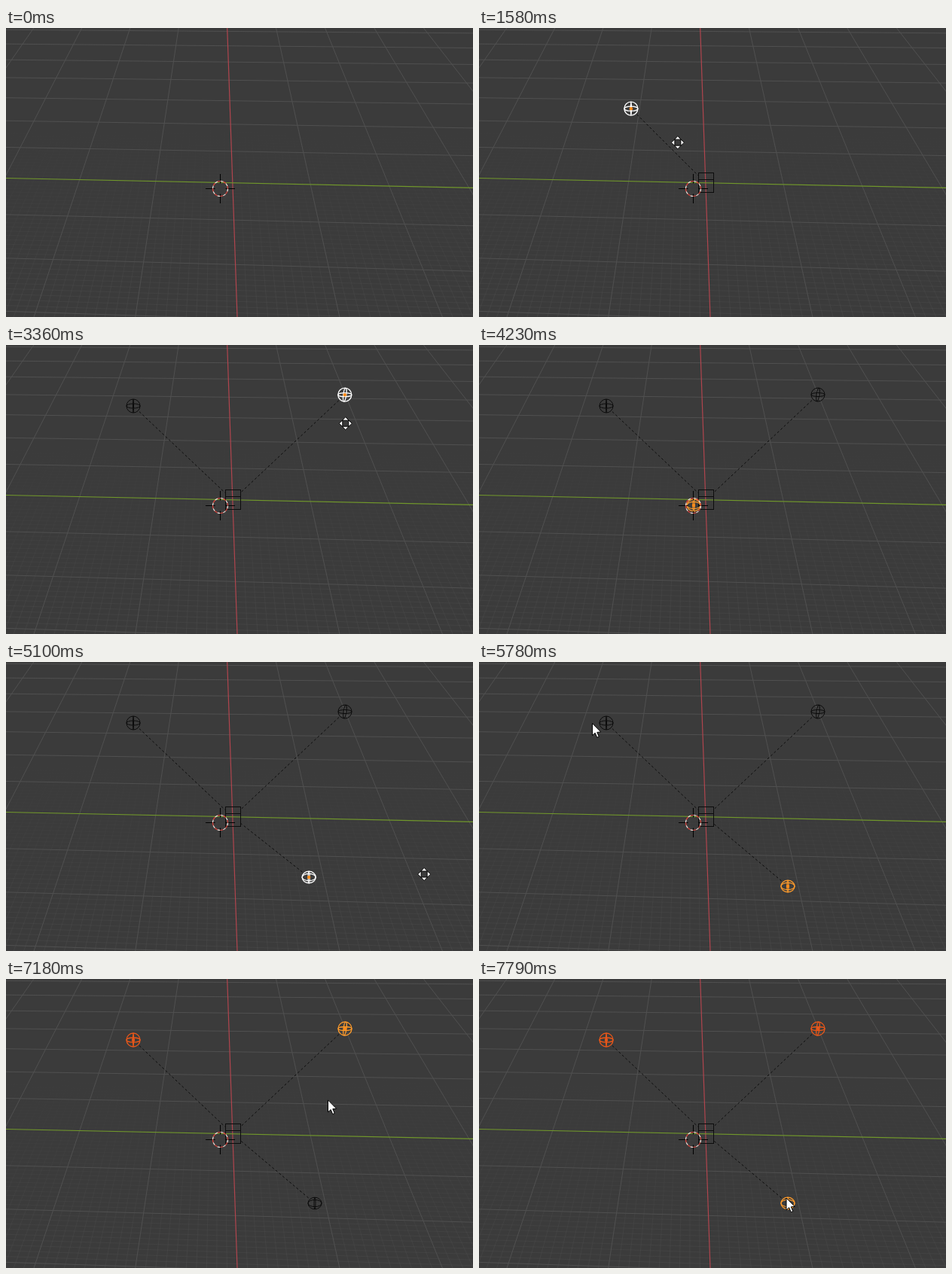
Animation, 620 px wide and 384 px high, one loop 8 s. Source, as an HTML page with a canvas:

```html
<!DOCTYPE html>
<html lang="en">
<head>
<meta charset="utf-8">
<title>Placing three lights</title>
<style>
  html, body { margin: 0; width: 100%; height: 100%; overflow: hidden; background: #3b3b3b; }
  canvas { position: absolute; left: 0; top: 0; width: 620px; height: 384px; }
</style>
</head>
<body>
<canvas id="floor" width="620" height="384"></canvas>
<canvas id="scene" width="620" height="384"></canvas>
<script>
const W = 620, H = 384, LOOP = 8000, STEP = 78;
const BLACK = '#0c0c0c', WHITE = '#ffffff', ACTIVE = '#fb9a2c', PICKED = '#e8571a';
const ORIGIN = [301, 206], PIVOT = [285, 213];

const floor = document.getElementById('floor').getContext('2d');
const ctx = document.getElementById('scene').getContext('2d');

function line(c, x1, y1, x2, y2, color, width = 1) {
  c.strokeStyle = color;
  c.lineWidth = width;
  c.beginPath();
  c.moveTo(x1, y1);
  c.lineTo(x2, y2);
  c.stroke();
}

// Perspective floor: k counts cells towards the viewer, j counts cells to the right.
function rowLine(k, color, width) {
  const d = 1 - 0.0823 * k;
  line(floor, 0, -340 + 539.5 / d, W, -350 + 562.4 / d, color, width);
}
function columnLine(j, color, width) {
  line(floor, 293.7 + 64.7 * j + 0.12 * j * j, 0, 307 + 135.6 * j + 0.3 * j * j, H, color, width);
}
function drawFloor() {
  floor.fillStyle = '#3b3b3b';
  floor.fillRect(0, 0, W, H);
  const faint = floor.createLinearGradient(0, 130, 0, H);
  faint.addColorStop(0, 'rgba(84,84,84,0)');
  faint.addColorStop(1, 'rgba(84,84,84,.3)');
  for (let i = -30; i <= 34; i++) if (i % 10) rowLine(i / 10, faint);
  for (let i = -50; i <= 50; i++) if (i % 10) columnLine(i / 10, faint);
  for (let k = -7; k <= 3; k++) if (k) rowLine(k, '#505050');
  for (let j = -5; j <= 5; j++) if (j) columnLine(j, '#505050');
  columnLine(0, '#b0454e', 1.2);
  rowLine(0, '#71982b', 1.2);
}

// A curved hand movement that slows down and is sampled once per STEP.
const mid = (a, b) => a.map((v, i) => (v + b[i]) / 2);
const shift = (p, from, to) => p.map((v, i) => v + to[i] - from[i]);
function glide(start, end, from, to, via = mid(from, to), leaves = false) {
  return { start, end, from, to, via, leaves };
}
function along({ start, end, from, to, via }, t) {
  const held = Math.floor((t - start) / STEP + 0.15) * STEP;
  const q = (1 - Math.min(1, Math.max(0, held / (end - start)))) ** 1.56, p = 1 - q;
  return from.map((v, i) => q * q * v + 2 * p * q * via[i] + p * p * to[i]);
}

// ry: outline height, flat: level ring height, slim: upright ring width.
const lights = [
  { born: 850, grab: 1330, settle: 1720, picked: 6090, hand: [347, 258],
    via: [241, 132], home: [169, 81], ry: 9, flat: 3, slim: 0.5, tilt: 0 },
  { born: 2660, grab: 3050, settle: 3366, picked: 6930, hand: [286, 251],
    via: [360, 150], home: [450, 66], ry: 9, flat: 2.5, slim: 2, tilt: 0.14 },
  { born: 4230, grab: 4380, settle: 5318, picked: 7710, hand: [438, 209],
    via: [380, 245], home: [410, 298], ry: 7.8, flat: 4.6, slim: 1, tilt: 0 }
];
const SELECT = lights[0].picked;
lights.forEach((light, i) => {
  const next = lights[i + 1] || { born: SELECT, picked: LOOP };
  light.drop = light.settle + STEP;
  light.rest = next.born;
  light.passed = next.picked;
  light.path = glide(light.grab, light.settle, PIVOT, light.home, light.via);
});

function lightColor({ born, grab, drop, rest, picked, passed }, t) {
  if (t < born) return null;
  if (t >= grab && t < drop) return WHITE;
  if (t < rest) return ACTIVE;
  if (t < picked) return BLACK;
  return t < passed ? ACTIVE : PICKED;
}

const drag = ({ grab, settle, hand, home, via }) =>
  glide(grab, settle, hand, shift(hand, PIVOT, home), shift(hand, PIVOT, via));
const drags = lights.map(drag);
const release = (i, end, to, via, leaves) =>
  glide(lights[i].drop, end, drags[i].to, to, via, leaves);

const atFirst = [169, 83], atSecond = [442, 64], atThird = [408, 291], corner = [570, 347];
const strokes = [
  glide(70, 150, corner, corner, corner, true),
  glide(1020, 1170, [386, 242], [347, 259]),
  drags[0],
  release(0, 2110, [495, 150], undefined, true),
  glide(2660, 2810, [434, 200], [286, 251]),
  drags[1],
  release(1, 3680, [560, 130], undefined, true),
  drags[2],
  release(2, 5940, atFirst, [60, 60]),
  glide(6090, 6860, atFirst, atSecond, [393, 27]),
  glide(6930, 7710, atSecond, atThird)
];

function ring(x, y, rx, ry, tilt = 0) {
  ctx.beginPath();
  ctx.ellipse(x, y, rx, ry, tilt, 0, Math.PI * 2);
  ctx.stroke();
}
function disc(x, y, r, color) {
  ctx.fillStyle = color;
  ctx.beginPath();
  ctx.arc(x, y, r, 0, Math.PI * 2);
  ctx.fill();
}

function drawTether(x, y) {
  const dx = ORIGIN[0] - x, dy = ORIGIN[1] - y, len = Math.hypot(dx, dy);
  if (len < 30) return;
  const at = d => [x + dx * d / len, y + dy * d / len];
  ctx.setLineDash([3, 3]);
  line(ctx, ...at(11), ...at(len - 14), BLACK);
  ctx.setLineDash([]);
}

function drawLight(light, t) {
  const color = lightColor(light, t);
  if (!color) return;
  const [x, y] = along(light.path, t);
  drawTether(x, y);
  ctx.strokeStyle = color;
  ctx.lineWidth = color === BLACK ? 1 : 1.3;
  ring(x, y, 9, light.ry);
  ring(x, y, 9, light.flat);
  ring(x, y, light.slim, light.ry, light.tilt);
  if (color !== BLACK) disc(x, y, 2.2, color === PICKED ? PICKED : '#ff8c1a');
}

function drawBox() {
  ctx.strokeStyle = BLACK;
  ctx.lineWidth = 1;
  ctx.strokeRect(291.5, 192.5, 20, 26);
  line(ctx, 291, 201.5, 311, 201.5, BLACK);
}

function drawPivot() {
  const x = 284.5, y = 213.5, dash = 10 * Math.PI / 8;
  for (const s of [-1, 1]) {
    line(ctx, x + s * 7, y, x + s * 19.5, y, '#000');
    line(ctx, x, y + s * 7, x, y + s * 19.5, '#000');
  }
  ctx.setLineDash([dash, dash]);
  ['#f4e6e2', '#e2443c'].forEach((color, i) => {
    ctx.strokeStyle = color;
    ctx.lineWidth = 1.2;
    ctx.lineDashOffset = i * dash;
    ring(x, y, 10, 10);
  });
  ctx.lineDashOffset = 0;
  ctx.setLineDash([]);
}

function shape(points, x, y) {
  ctx.beginPath();
  for (const [px, py] of points) ctx.lineTo(x + px, y + py);
  ctx.closePath();
  ctx.fillStyle = WHITE;
  ctx.strokeStyle = '#000';
  ctx.lineWidth = 1;
  ctx.fill();
  ctx.stroke();
}
function drawArrow(x, y) {
  shape([[0, 0], [0, 16], [3.7, 12.7], [6.2, 18.7], [8.8, 17.6], [6.3, 11.8], [11.2, 11.4]], x, y);
}
function drawMove(x, y) {
  for (let i = 0; i < 4; i++) {
    ctx.save();
    ctx.translate(x, y);
    ctx.rotate(i * Math.PI / 2);
    shape([[0, -8.6], [4.3, -4], [-4.3, -4]], 0, 0);
    ctx.restore();
  }
}

function drawPointer(t) {
  const stroke = strokes.filter(s => s.start <= t).pop();
  if (!stroke || (stroke.leaves && t >= stroke.end)) return;
  const [x, y] = along(stroke, t);
  if (lights.some(l => t >= l.picked && t < l.picked + STEP)) disc(x, y, 12, 'rgba(255,255,0,.47)');
  const moving = lights.some(l => t >= l.grab && t < l.drop);
  (moving ? drawMove : drawArrow)(x, y);
}

function draw(t) {
  ctx.clearRect(0, 0, W, H);
  if (t >= lights[0].born) drawBox();
  for (const light of lights) drawLight(light, t);
  drawPivot();
  drawPointer(t);
}

drawFloor();
const begin = performance.now();
function tick() {
  draw((performance.now() - begin) % LOOP);
  requestAnimationFrame(tick);
}
tick();
</script>
</body>
</html>
```
